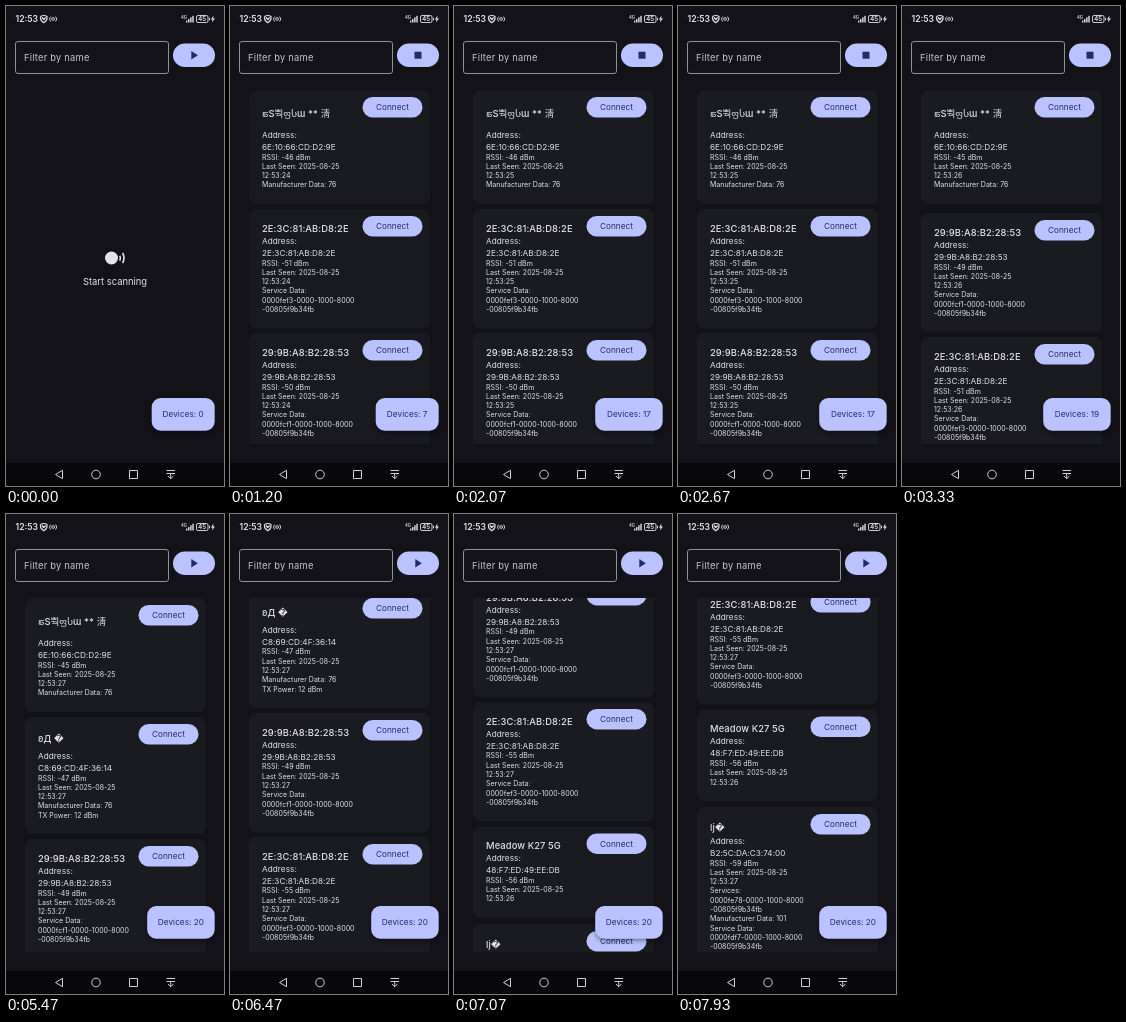
These frames come from a looping animation (218x480 px, 8 s). An HTML page with a canvas:

```html
<!DOCTYPE html>
<html lang="en">
<head>
<meta charset="utf-8">
<title>Device scanner</title>
<style>
  html, body { margin: 0; width: 218px; height: 480px; overflow: hidden; background: #121218; }
  canvas { display: block; width: 218px; height: 480px; }
</style>
</head>
<body>
<canvas id="stage"></canvas>
<script>
const LOOP = 8000, SCAN_START = 540, FIRST_FOUND = 800, SCAN_END = 4860;
const BG = '#121218', CARD = '#1a1a21', ACCENT = '#bac3ff', ON_ACCENT = '#222c61', TEXT = '#e4e1e9';
const FONT = 'Inter, "DejaVu Sans", "Noto Sans CJK KR", "Noto Sans CJK JP", sans-serif';
const LINE = 9.3;
const canvas = document.getElementById('stage');
const ctx = canvas.getContext('2d');
const ratio = window.devicePixelRatio || 1;
canvas.width = 218 * ratio;
canvas.height = 480 * ratio;

// Critically damped spring, 0 to 1
const spring = t => t < 0 ? 0 : 1 - (1 + t / 50) * Math.exp(-t / 50);
const clamp = v => Math.min(1, Math.max(0, v));
const uuid = id => [`0000${id}-0000-1000-8000`, '-00805f9b34fb'];
const serviceData = id => ['Service Data:', ...uuid(id)];

// titleY and bodyY are offsets from the card top; moves are [time, new top]
const devices = [
  { name: 'ຮS뿩ფႱɯ ** 淸', mac: '6E:10:66:CD:D2:9E', titleY: 23.5, bodyY: 45, top: 84, moves: [],
    rssi: t => t < 2750 ? -46 : -45, extra: () => ['Manufacturer Data: 76'] },
  { name: 'ʚД \uFFFD', mac: 'C8:69:CD:4F:36:14', titleY: 21.5, bodyY: 39, top: 203, moves: [], found: 4330,
    rssi: () => -47, extra: () => ['Manufacturer Data: 76', 'TX Power: 12 dBm'] },
  { name: '2E:3C:81:AB:D8:2E', top: 203, moves: [[2700, 331], [3350, 327], [4295.5, 449]],
    rssi: t => t < 3800 ? -51 : -55, extra: t => t > 3800 && t < 4600 ? [] : serviceData('fef3') },
  { name: '29:9B:A8:B2:28:53', top: 327, moves: [[2700, 207], [3350, 203], [4287, 325]],
    rssi: t => t < 2750 ? -50 : -49, extra: () => serviceData('fcf1') },
  { name: 'Meadow K27 5G', mac: '48:F7:ED:49:EE:DB', top: 451, moves: [[3850, 424.5], [4324, 573.5]],
    rssi: () => -56, lastSeen: 26, extra: () => [] },
  { name: 'lj\uFFFD', mac: 'B2:5C:DA:C3:74:00', titleY: 20.5, bodyY: 34, top: 671, moves: [],
    rssi: () => -59, extra: () => ['Services:', ...uuid('fe78'), 'Manufacturer Data: 101', ...serviceData('fdf7')] }
];

function text(str, x, y, size, { color = TEXT, weight = 400, align = 'left', spacing = 0 } = {}) {
  ctx.font = `${weight} ${size}px ${FONT}`;
  ctx.letterSpacing = spacing + 'px';
  ctx.textAlign = align;
  ctx.fillStyle = color;
  ctx.fillText(str, x, y + size * 0.36);
}

function box(x, y, w, h, r, color) {
  ctx.beginPath();
  ctx.roundRect(x, y, w, h, r);
  ctx.fillStyle = color;
  ctx.fill();
}

function stroke(path, color = TEXT, width = 1) {
  ctx.strokeStyle = color;
  ctx.lineWidth = width;
  ctx.stroke(new Path2D(path));
}

function fill(path, color = TEXT) {
  ctx.fillStyle = color;
  ctx.fill(new Path2D(path));
}

function statusBar() {
  text('12:53', 9.5, 13, 8.6, { weight: 600 });
  stroke('M34.5 10.5Q38 8.5 41 10.5Q41.5 14.5 37.8 16.8Q34 14.5 34.5 10.5M36 11.5l1.8 2l1.8 -2', TEXT, 1.2);
  stroke('M44.6 10.6Q42.4 13 44.6 15.6M49.6 10.6Q51.8 13 49.6 15.6M45.7 13a1.4 1.4 0 1 0 2.8 0a1.4 1.4 0 1 0 -2.8 0', TEXT, 0.9);
  text('4G', 175, 11, 4.2, { weight: 600 });
  for (let i = 0; i < 4; i++) box(180 + i * 2.1, 14.5 - i * 1.6, 1.4, 2 + i * 1.6, 0.3, TEXT);
  stroke('M192 9.5h8.5q1.5 0 1.5 1.5v4q0 1.5 -1.5 1.5h-8.5q-1.5 0 -1.5 -1.5v-4q0 -1.5 1.5 -1.5M203.5 11.7v2.6', TEXT, 0.9);
  text('45', 196.2, 13, 6.4, { weight: 600, align: 'center' });
  fill('M207.6 9.6l-2.8 4h1.8l-.6 3l3 -4.2h-1.9z');
}

function navBar() {
  box(0, 457, 218, 23, 0, '#08080c');
  const color = '#d2d2d4';
  stroke('M56.5 464.3v8.4l-7 -4.2z', color);
  stroke('M85.7 468.5a4.3 4.3 0 1 0 8.6 0a4.3 4.3 0 1 0 -8.6 0', color);
  stroke('M123.5 464.5h8v8h-8z', color);
  stroke('M160.5 464.5h8.5M160.5 467.5h8.5M164.7 467.5v5M162 470l2.7 2.7l2.7 -2.7', color);
}

function toolbar(scanning) {
  stroke('M12 35.5h148q2.5 0 2.5 2.5v27q0 2.5 -2.5 2.5h-148q-2.5 0 -2.5 -2.5v-27q0 -2.5 2.5 -2.5z', '#8f909a');
  text('Filter by name', 18, 51.5, 9.4, { color: '#c6c5d0', spacing: 0.2 });
  box(167, 37.5, 42, 23.5, 11.75, ACCENT);
  if (scanning) box(184.5, 45.7, 7, 7, 0, ON_ACCENT);
  else fill('M185.3 45v8.4l6.6 -4.2z', ON_ACCENT);
}

function emptyState() {
  ctx.beginPath();
  ctx.arc(105.5, 252, 6.5, 0, 7);
  ctx.fillStyle = TEXT;
  ctx.fill();
  stroke('M113.8 249.8q1.3 2.4 0 4.8M116.6 247q2.8 5 0 10', TEXT, 1.6);
  text('Start scanning', 109, 275.5, 9.4, { align: 'center' });
}

function card(device, t, scroll, second) {
  const { name, mac = name, titleY = 19.5, bodyY = 32, found = FIRST_FOUND, moves } = device;
  let y = device.top - scroll, from = device.top;
  for (const [time, to] of moves) {
    y += (to - from) * spring(t - time);
    from = to;
  }
  const small = [
    `RSSI: ${device.rssi(t)} dBm`, 'Last Seen: 2025-08-25',
    `12:53:${device.lastSeen || second}`, ...device.extra(t)
  ];
  ctx.globalAlpha = spring(t - found);
  box(19, y, 181, bodyY + 41 + (small.length - 1) * LINE, 7, CARD);
  text(name, 32, y + titleY, 9.4, { weight: 500, spacing: 0.09 });
  text('Address:', 32, y + bodyY, 8.2, { spacing: 0.05 });
  text(mac, 32, y + bodyY + 12, 8.2, { spacing: 0.02 });
  small.forEach((line, i) => text(line, 32, y + bodyY + 22 + i * LINE, 7, { spacing: 0.02 }));
  box(132.5, y + 7, 60, 20.5, 10.25, ACCENT);
  text('Connect', 162.5, y + 17.3, 8.2, { color: ON_ACCENT, align: 'center', spacing: 0.05 });
  ctx.globalAlpha = 1;
}

function deviceCount(t) {
  if (t < FIRST_FOUND) return 0;
  if (t < 2000) return 3 + Math.floor((t - FIRST_FOUND) / 1200 * 14);
  return 17 + [2700, 3100, 3850].filter(time => t >= time).length;
}

function counter(count) {
  const width = count > 9 ? 67.5 : 63;
  ctx.shadowColor = 'rgba(0,0,0,.4)';
  ctx.shadowBlur = 4 * ratio;
  ctx.shadowOffsetY = 2 * ratio;
  box(208.7 - width, 392, width, 32.7, 9, ACCENT);
  ctx.shadowColor = 'transparent';
  text(`Devices: ${count}`, 208.7 - width / 2, 408.3, 8.2, { color: ON_ACCENT, align: 'center', spacing: 0.05 });
}

function draw(now) {
  const t = now % LOOP;
  const scroll = 378 * (1 - (1 - clamp((t - 6000) / 1930)) ** 1.45);
  const second = 24 + [1800, 2750, 3800].filter(time => t >= time).length;
  ctx.setTransform(ratio, 0, 0, ratio, 0, 0);
  box(0, 0, 218, 480, 0, BG);
  statusBar();
  toolbar(t >= SCAN_START && t < SCAN_END);
  if (t < SCAN_START) emptyState();
  ctx.save();
  ctx.beginPath();
  ctx.rect(0, 84, 218, 354);
  ctx.clip();
  devices.forEach(device => card(device, t, scroll, second));
  ctx.restore();
  counter(deviceCount(t));
  navBar();
  requestAnimationFrame(draw);
}
requestAnimationFrame(draw);
</script>
</body>
</html>
```
